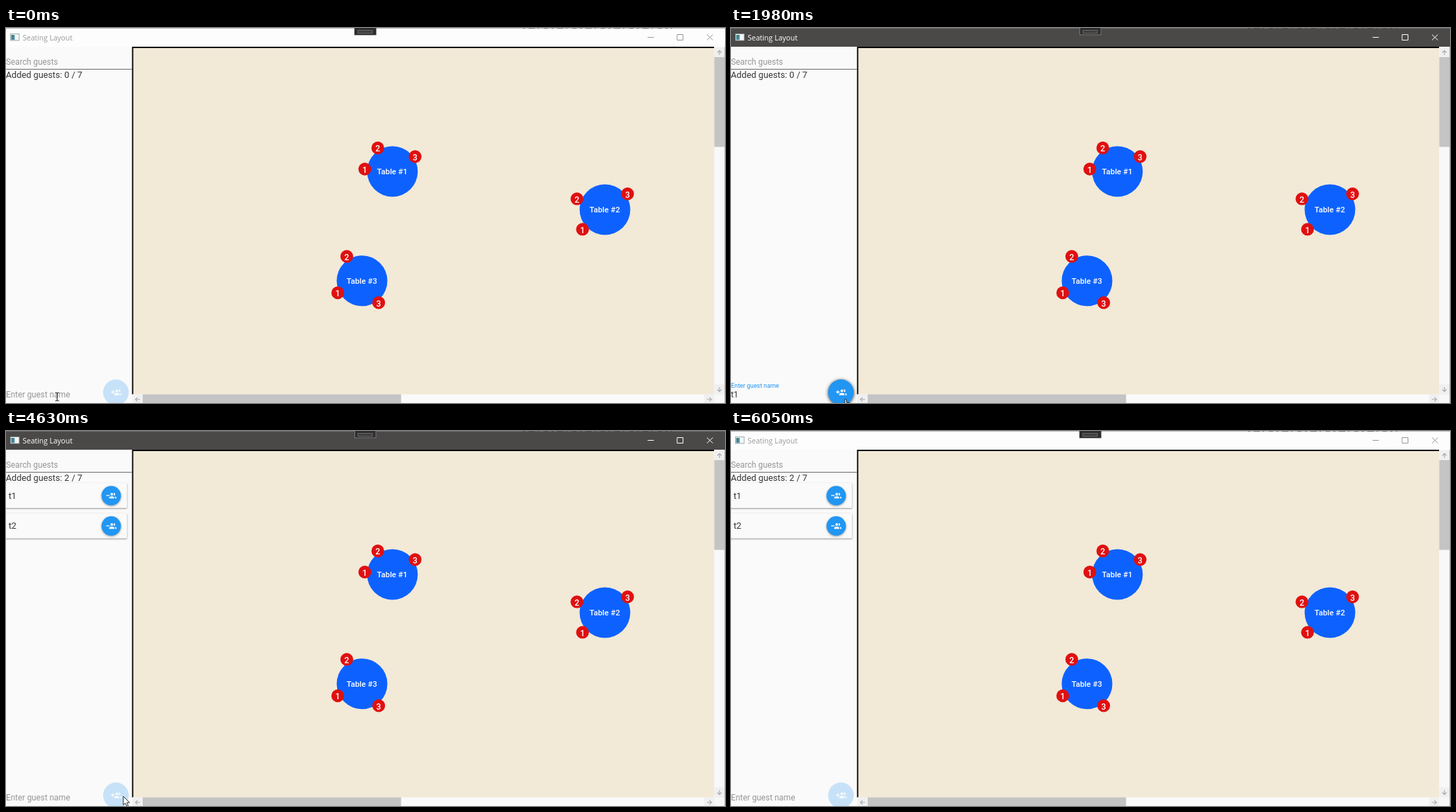
An HTML page for the animation above (6.15 s loop, 1036x541 px).

```html
<!DOCTYPE html>
<html lang="en">
<head>
<meta charset="utf-8">
<title>Seating Layout</title>
<style>
  html, body { margin: 0; width: 100%; height: 100%; overflow: hidden; background: #fafafa; }
  svg { display: block; font-family: Roboto, sans-serif; }
  .title { font: 10.5px "Open Sans", sans-serif; }
  .hint { font-size: 11.85px; fill: #969696; }
  .body { font-size: 12.75px; fill: #363636; }
  .table { font-size: 11.4px; font-weight: 500; fill: #fff; text-anchor: middle; }
  .seat { font-size: 12px; font-weight: 500; fill: #fff; text-anchor: middle; }
  .card { filter: drop-shadow(0.5px 1px 1.3px rgba(0,0,0,.42)); }
  .raised { filter: drop-shadow(0 1px 1.5px rgba(0,0,0,.4)); }
  .hover { filter: drop-shadow(0 1px 2.6px rgba(0,0,0,.75)); }
  .off { opacity: .23; }
</style>
</head>
<body>
<svg width="1036" height="541" viewBox="0 0 1036 541" xmlns="http://www.w3.org/2000/svg">
  <defs>
    <linearGradient id="pane" x1="0" y1="0" x2="1" y2="1">
      <stop offset="0" stop-color="#2f7f73"/><stop offset="1" stop-color="#5d8fb5"/>
    </linearGradient>
    <path id="people" d="M13 13c-2 0-6 1-6 3v2h12v-2c0-2-4-3-6-3M19.6 13.2c.8.7 1.4 1.600 1.400 2.800v2h3v-2c0-1.500-2.400-2.500-4.400-2.800M13 11a3 3 0 1 0 0-6a3 3 0 0 0 0 6M18 11a3 3 0 1 0-.9-5.860a5 5 0 0 1 0 5.710q.4.15.9.15"/>
    <path id="arrow" d="M-3 0L0-3L3 0M0-3V3.500" fill="none" stroke-width="1.1"/>
  </defs>

  <rect width="1036" height="541" fill="#fafafa"/>

  <!-- title bar -->
  <rect id="bar" width="1036" height="27"/>
  <rect id="edge" width="1036" height="1"/>
  <path d="M745 .4H960" stroke="#333" stroke-width=".8" stroke-dasharray="3 5 9 4 2 7 6 5" opacity=".7"/>
  <rect x="6.500" y="8.500" width="12.500" height="9.500" fill="#f4f6f6" stroke="#8b9a9c" stroke-width=".8"/>
  <rect x="7.500" y="10" width="5" height="7.200" fill="url(#pane)"/>
  <text id="title" class="title" x="24" y="17.500">Seating Layout</text>
  <path id="controls" d="M924.500 13.500H933.500M967 9.500H975.500V17.500H967ZM1010 9.500L1018.500 17.500M1018.500 9.500L1010 17.500" fill="none"/>
  <rect id="tab" x="502.500" y="-1" width="30.500" height="10.800" fill="#2d2d2e"/>
  <rect x="507" y="3.500" width="21" height="4" fill="#3c3c3d" stroke="#707070" stroke-width=".9"/>

  <!-- side panel -->
  <text class="hint" x="0" y="52.700">Search guests</text>
  <path d="M0 59.500H182" stroke="#6b6b6b"/>
  <g id="cards"></g>
  <text id="count" class="body" x="-.3" y="72.300"></text>
  <text id="label" class="hint" x="0"></text>
  <text id="typed" class="hint" x="0" y="533.200" style="fill:#363636"></text>
  <rect id="caret" y="523" width="1" height="13" fill="#2196f3"/>
  <g id="add">
    <circle cx="158.400" cy="525.600" r="18.500" fill="#2196f3"/>
    <g transform="translate(151.400 518.200) scale(.64)" fill="#fff"><use href="#people"/><path d="M8 10H5V7H3V10H0V12H3V15H5V12H8Z"/></g>
  </g>

  <!-- floor plan -->
  <rect x="181.500" y="27" width="839" height="502" fill="#f2e9d7"/>
  <path d="M182.500 529V28H1020.500" fill="none" stroke="#000" stroke-width="1.800"/>
  <g id="plan"></g>

  <!-- scroll bars -->
  <rect x="1020.500" y="27" width="15.500" height="514" fill="#f8f8f8"/>
  <rect x="181.500" y="528.500" width="839" height="13" fill="#fafafa"/>
  <path d="M1020.500 28H1036V42H1020.500ZM1020.500 514H1036V528.500H1020.500ZM182 528.500H197V541H182ZM1006 528.500H1020.500V541H1006Z" fill="#f0f0f0"/>
  <rect x="1020.500" y="42" width="15.500" height="129.500" fill="#c4c4c4"/>
  <rect x="197" y="528.500" width="372.300" height="13" fill="#c4c4c4"/>
  <g stroke="#a8a8a8">
    <use href="#arrow" transform="translate(1028 35.500)"/>
    <use href="#arrow" transform="translate(1028 521.500) rotate(180)"/>
  </g>
  <g id="ends">
    <use href="#arrow" transform="translate(189.500 535.800) rotate(-90)"/>
    <use href="#arrow" transform="translate(1013.500 535.800) rotate(90)"/>
  </g>
  <path d="M1035.500 27V541" stroke="#b5b5b5" stroke-width=".8"/>

  <!-- pointers -->
  <path id="beam" d="M-2.800-6Q-.5-6 0-5Q.5-6 2.800-6M0-5V5M-2.800 6Q-.5 6 0 5Q.5 6 2.800 6" fill="none" stroke="#333" stroke-width="1.200"/>
  <path id="point" d="M0 0V12.500L2.900 9.900L5 14.500L7.100 13.500L5.100 9.100H9Z" fill="#fff" stroke="#111" stroke-width=".9"/>
  <path id="hand" d="M0 .8Q1.200-.6 2.300.8V5L7.500 6.200Q9 6.700 8.700 9L7.500 14H1.500L-2.500 8.500Q-2.500 6.700-1 7.300L0 8.300Z" fill="#fff" stroke="#111" stroke-width=".9"/>
</svg>

<script>
const $ = id => document.getElementById(id);
const set = (id, attrs) => { for (const k in attrs) $(id).setAttribute(k, attrs[k]); };
const LOOP = 6150;

// Tables: centre, then the centres of seats 1 to 3
const tables = [
  [556.8, 207, [517, 203.5], [535.7, 173], [589.5, 185.5]],
  [863, 262, [830.7, 290.4], [822.7, 246.4], [895.6, 239.3]],
  [513, 364.7, [478, 382], [491, 329.5], [537, 396.3]]
];
$('plan').innerHTML = tables.map(([x, y, ...seats], i) =>
  `<circle cx="${x}" cy="${y}" r="36.500" fill="#0d62ff"/>
   <text class="table" x="${x - .3}" y="${y + 4.3}">Table #${i + 1}</text>` +
  seats.map(([sx, sy], n) =>
    `<circle cx="${sx}" cy="${sy}" r="9.200" fill="#e01010"/>
     <text class="seat" x="${sx}" y="${sy + 5.2}">${n + 1}</text>`).join('')
).join('');

$('cards').innerHTML = [0, 1].map(i =>
  `<g transform="translate(0 ${i * 43.8})">
     <rect class="card" x="-4" y="75" width="178.300" height="36" fill="#fafafa"/>
     <text class="body" x="3.700" y="97.700">t${i + 1}</text>
     <circle class="raised" cx="151.600" cy="93.300" r="14" fill="#2196f3"/>
     <g transform="translate(144.300 86.200) scale(.62)" fill="#fff"><use href="#people"/><path d="M0 10H8V12H0Z"/></g>
   </g>`).join('');
$('label').textContent = 'Enter guest name';

// Each step overrides the state before it
const steps = [
  [0, { active: false, focus: false, caret: false, text: '', lift: 0, guests: 0, button: 'off', cursor: 'beam', x: 73.7, y: 532, scroll: false }],
  [1060, { active: true, focus: true, caret: true }],
  [1320, { text: 't', lift: 1, button: 'raised' }],
  [1440, { text: 't1', x: 108, y: 533 }],
  [1560, { cursor: 'hand', x: 150, y: 534, button: 'hover' }],
  [1710, { x: 164, y: 535 }],
  [1980, { caret: false }],
  [2390, { guests: 1, text: '', lift: 0, caret: true, button: 'off', cursor: 'point' }],
  [2990, { text: 't', lift: 1, button: 'raised', cursor: 'hand' }],
  [3140, { text: 't2', button: 'hover' }],
  [3500, { caret: false, x: 167, y: 530 }],
  [3620, { x: 169, y: 528 }],
  [4210, { focus: false }],
  [4360, { guests: 2, text: '', lift: .5, button: 'off', cursor: 'point', y: 527 }],
  [4480, { lift: .08 }],
  [4630, { lift: 0 }],
  [5060, { x: 179 }],
  [5210, { x: 330, y: 529, scroll: true }],
  [5360, { x: 612, y: 477, scroll: false }],
  [5510, { x: 752, y: 495 }],
  [5650, { x: 770, y: 464 }],
  [5770, { x: 786, y: 434 }],
  [5920, { cursor: '' }],
  [6050, { active: false }]
];

function draw(s) {
  set('bar', { fill: s.active ? '#4a4947' : '#fdfdfd' });
  set('edge', { fill: s.active ? '#6c6b69' : '#bdbdbd' });
  set('title', { fill: s.active ? '#fff' : '#999' });
  set('controls', { stroke: s.active ? '#fff' : '#999' });
  set('tab', { stroke: s.active ? '#77767a' : '#2d2d2e' });
  $('count').textContent = `Added guests: ${s.guests} / 7`;
  [...$('cards').children].forEach((card, i) => { card.style.display = i < s.guests ? '' : 'none'; });
  set('label', { y: 533.2 - 13.9 * s.lift });
  $('label').style.fontSize = 11.85 * (1 - s.lift / 4) + 'px';
  $('label').style.fill = s.focus ? '#2196f3' : '#969696';
  $('typed').textContent = s.text;
  set('caret', { x: [0, 3.8, 10.4][s.text.length], visibility: s.caret ? 'visible' : 'hidden' });
  set('add', { class: s.button });
  set('ends', { stroke: s.scroll ? '#555' : '#a8a8a8' });
  for (const id of ['beam', 'point', 'hand'])
    set(id, { transform: `translate(${s.x} ${s.y})`, visibility: s.cursor === id ? 'visible' : 'hidden' });
}

const start = performance.now();
let shown = -1;
function tick() {
  const t = (performance.now() - start) % LOOP;
  const n = steps.filter(([at]) => at <= t).length;
  if (n !== shown) {
    draw(Object.assign({}, ...steps.slice(0, n).map(step => step[1])));
    shown = n;
  }
  requestAnimationFrame(tick);
}
tick();
</script>
</body>
</html>
```
